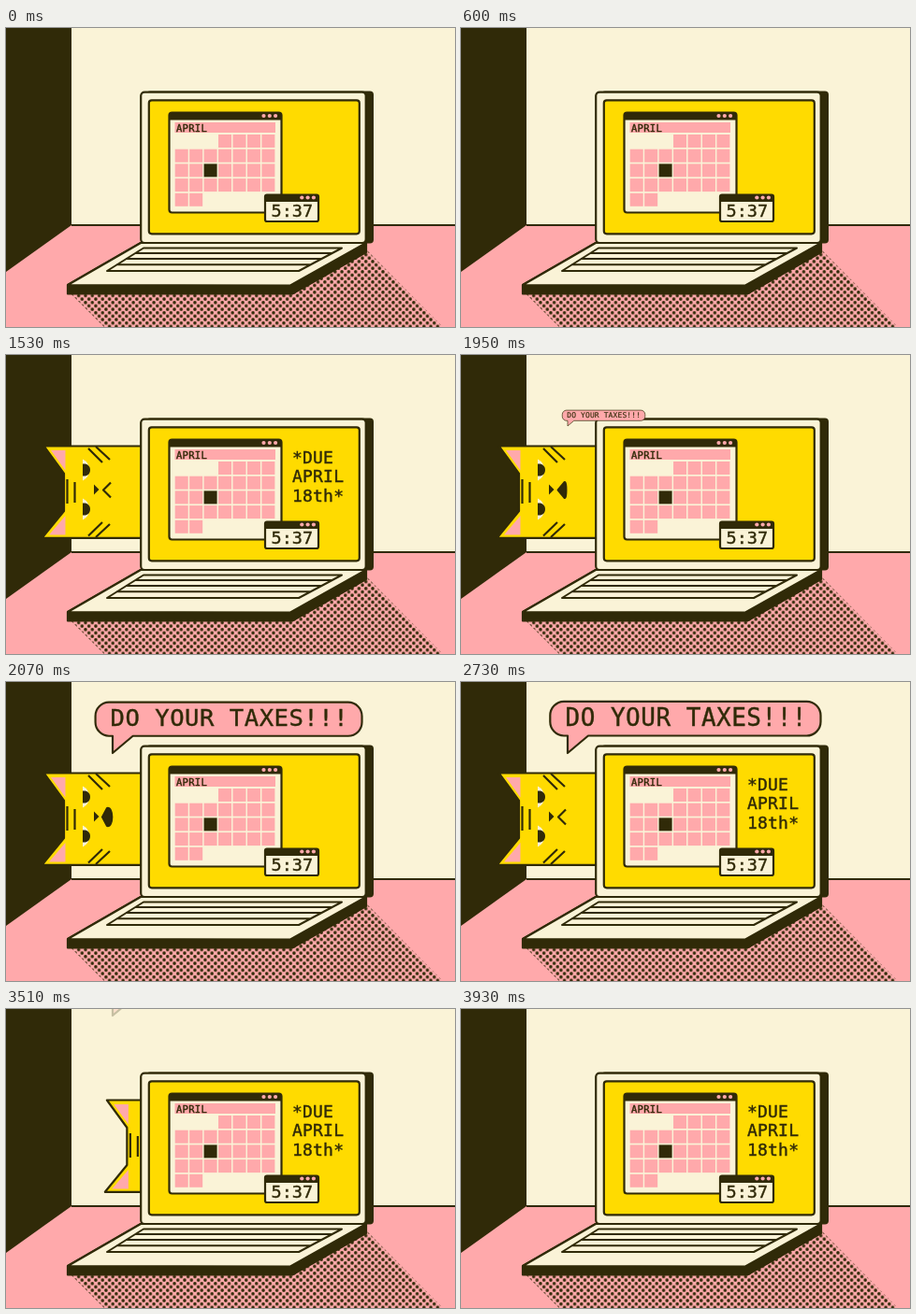
An HTML page for the animation above (4.17 s loop, 480x320 px).

```html
<!DOCTYPE html>
<html lang="en">
<head>
<meta charset="utf-8">
<title>Tax reminder</title>
<style>
html, body { margin: 0; width: 100%; height: 100%; overflow: hidden; background: #faf3d7; }
svg { display: block; width: 480px; height: 320px; }
text { font-family: "DejaVu Sans Mono", "Liberation Mono", monospace; fill: #302a08; stroke: #302a08; stroke-width: .4; white-space: pre; }
.ink { fill: #302a08; }
.cream { fill: #faf3d7; }
.pink { fill: #ffa9ab; }
.yellow { fill: #ffdb00; }
.line { stroke: #302a08; stroke-width: 2.2; stroke-linejoin: round; }
.open { fill: none; stroke-linecap: butt; }
</style>
</head>
<body>
<svg viewBox="0 0 480 320">
  <defs>
    <pattern id="dots" x="211.1" y="295.6" width="7.31" height="7.31" patternUnits="userSpaceOnUse">
      <circle class="ink" cx="1.83" cy="1.83" r="1.75"/>
      <circle class="ink" cx="5.48" cy="5.48" r="1.75"/>
    </pattern>
    <g id="buttons" class="pink">
      <circle r="2.1"/><circle cx="6.3" r="2.1"/><circle cx="12.6" r="2.1"/>
    </g>
  </defs>

  <!-- room -->
  <rect class="cream" width="480" height="320"/>
  <path class="pink" d="M0 211H480V320H0Z"/>
  <path class="line" d="M70 211H480" style="stroke-width:2"/>
  <path class="ink" d="M0 0H70V211L0 261Z"/>
  <path fill="url(#dots)" d="M68 283L105 320H467L386 238L306 283Z"/>

  <g id="cat">
    <path class="yellow line" d="M160 97.5H40.5L62 127V167L38.5 195.8H160Z"/>
    <path class="pink" d="M48 102H63.5V123.5ZM46 192.5H63.5V172Z"/>
    <path class="line open" d="M65.5 133V159M73.5 136V158M88 100L103 115M96 98L111 112M88 193.5L103 179M96 195L111 181"/>
    <g id="eyes"></g>
    <path class="ink" d="M94 138.5V149.5L99.5 144Z"/>
    <path id="mouth" class="line"/>
  </g>

  <!-- laptop -->
  <rect class="ink" x="150" y="67.5" width="243" height="163" rx="4"/>
  <path class="ink line" d="M66 275L144 230H385V240L306 284.5H66Z"/>
  <path class="cream line" d="M66 275L144 230H385L304 275.5Z"/>
  <rect class="cream line" x="144.2" y="68.6" width="240.5" height="161.4" rx="4"/>
  <rect class="yellow line" x="152.8" y="77.3" width="225" height="143" rx="3"/>
  <path class="line open" d="M147 235.5H359L313 260H108ZM138 241H349M128 246.9H338M118 253.3H326" style="stroke-width:2"/>

  <!-- calendar -->
  <rect class="cream line" x="174.5" y="90.5" width="120" height="107" rx="3"/>
  <path class="ink" d="M175 98.5V91H294V98.5Z"/>
  <use href="#buttons" x="275.5" y="94"/>
  <rect class="pink" x="180.5" y="101" width="107.5" height="11"/>
  <text x="182" y="110.5" font-size="10.5" letter-spacing=".3">APRIL</text>
  <g id="days"></g>

  <!-- clock -->
  <rect class="cream line" x="277" y="178.5" width="57" height="28.5" rx="2"/>
  <path class="ink" d="M277 186V178.5H334V186Z"/>
  <use href="#buttons" x="316.3" y="181.5"/>
  <text x="283.5" y="202" font-size="18.5">5:37</text>

  <g id="due" font-size="18" letter-spacing=".2">
    <text x="306" y="116">*DUE</text>
    <text x="306" y="136">APRIL</text>
    <text x="306" y="156.5">18th*</text>
  </g>

  <g id="bubble">
    <path class="pink line" d="M110 20.8H369.5A15 15 0 0 1 384.5 35.8V42.5A15 15 0 0 1 369.5 57.5H136L114 76V57.5H110A15 15 0 0 1 95.3 42.5V35.8A15 15 0 0 1 110 20.8Z"/>
    <text x="111.5" y="46.5" font-size="26" letter-spacing=".5">DO YOUR TAXES!!!</text>
  </g>
</svg>
<script>
const LOOP = 4170, HIDDEN = 107, MOUTH_Y = 144.5;
const $ = id => document.getElementById(id);
const clamp = x => Math.min(1, Math.max(0, x));

// eased progress from time a to time b
const ease = (t, a, b) => {
  const p = clamp((t - a) / (b - a));
  return p < .5 ? 4 * p ** 3 : 1 - 4 * (1 - p) ** 3;
};

let cells = '';
for (let i = 3; i < 30; i++) {
  const col = i % 7, row = Math.floor(i / 7);
  cells += `<rect class="${i === 16 ? 'ink' : 'pink'}" x="${180.7 + col * 15.45}" y="${114 + row * 15.7}" width="14" height="14"/>`;
}
$('days').innerHTML = cells;

// open: share of the eye below the lid
function drawEyes(open) {
  const eye = y => `<g transform="translate(${90 - 8 * open} ${y}) scale(${open} 1)">
    <path class="cream" d="M0 -11.5Q7 -8 7 0T0 11.5Z"/>
    <path class="ink" d="M0 -6.5H3Q8 -5 8 0T3 6.5H0Z"/></g>`;
  const lid = open < .2 ? '<path class="line open" d="M89 113V133M89 155V175"/>' : '';
  $('eyes').innerHTML = eye(123) + eye(165) + lid;
}

function lidAt(t) {
  for (const start of [1440, 2880]) {
    const step = Math.floor((t - start) / 30);
    if (step >= 0 && step < 3) return [.5, .1, .5][step];
  }
  return 1;
}

function drawMouth(open) {
  const x = 112 - 4 * open, h = 8 + 1.5 * open;
  const top = `${x} ${MOUTH_Y - h}`, bottom = `${x} ${MOUTH_Y + h}`;
  let d = `M${top}L${104 - open} ${MOUTH_Y}L${bottom}`;
  if (open > 0) {
    const jaw = x + 7 * open, spread = h + 1.5 * open;
    d += `C${jaw} ${MOUTH_Y + spread} ${jaw} ${MOUTH_Y - spread} ${top}Z`;
  }
  $('mouth').setAttribute('d', d);
  $('mouth').setAttribute('fill', open > 0 ? '#302a08' : 'none');
}

function draw(t) {
  const beat = Math.floor((t < 900 ? t : t - 30) / 300);
  $('due').style.display = beat % 2 ? '' : 'none';

  const out = ease(t, 973, 1230) - ease(t, 3367, 3630);
  $('cat').setAttribute('transform', `translate(${HIDDEN * (1 - out)} 0)`);
  drawEyes(lidAt(t));
  drawMouth(ease(t, 1830, 2115) - ease(t, 2265, 2520));

  const size = ease(t, 1830, 2115), exit = ease(t, 3330, 3630);
  $('bubble').style.display = size > 0 && exit < 1 ? '' : 'none';
  $('bubble').setAttribute('opacity', 1 - exit);
  $('bubble').setAttribute('transform', `translate(114 ${76 - 92 * exit}) scale(${size}) translate(-114 -76)`);
}

const begin = performance.now();
function tick() {
  draw((performance.now() - begin) % LOOP);
  requestAnimationFrame(tick);
}
tick();
</script>
</body>
</html>
```
